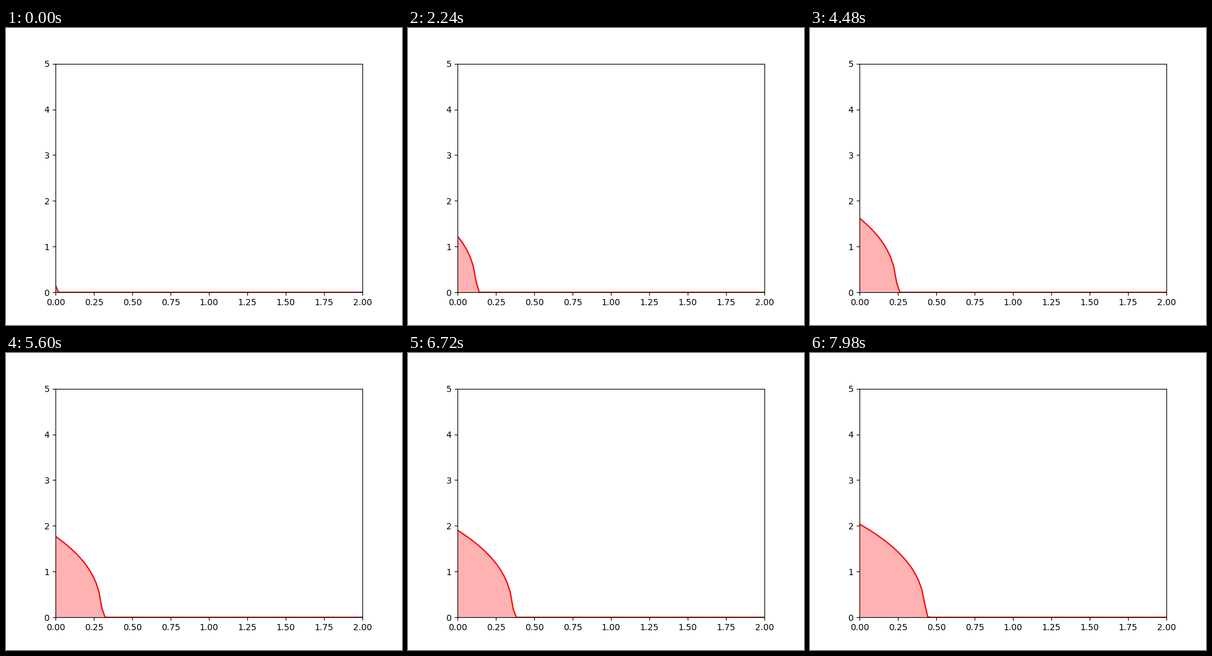
These frames come from a looping animation (640 px wide and 480 px high, 8000 ms). A matplotlib script:

```python
import numpy as np
import matplotlib.pyplot as plt
from matplotlib.animation import FuncAnimation

# Nonlinear heat wave u_t = (K u^P u_x)_x, driven from the left wall.
# Units: one grid cell in space, one visible step in time.
P = 2.5
SPEED = 0.3698
GAIN = 0.104
K = P * SPEED**2 / GAIN
SUB = 60
START = 5
STEPS = 58
HOLD = 7  # ticks of 20 ms per visible step

x = np.linspace(0, 2, 100)


def solve():
    u = np.zeros_like(x)
    dt = 1 / SUB
    out = []
    for n in range(1, START + (STEPS - 1) * SUB + 1):
        k = K * u**P
        flux = 0.5 * (k[1:] + k[:-1]) * np.diff(u)
        u[1:-1] += dt * np.diff(flux)
        u[0] = (GAIN * n * dt) ** (1 / P)
        if n % SUB == START:
            out.append(u.copy())
    return out


waves = solve()

fig, ax = plt.subplots(figsize=(6.4, 4.8), dpi=100)
ax.set_xlim(0, 2)
ax.set_ylim(0, 5)
line, = ax.plot(x, waves[0], color="red")
area, = ax.fill(x, waves[0], facecolor="red", alpha=0.3, linewidth=0)


def outline(u):
    xs = np.concatenate(([0], x, [2]))
    ys = np.concatenate(([0], u, [0]))
    return np.column_stack((xs, ys))


def update(i):
    u = waves[i // HOLD]
    line.set_ydata(u)
    area.set_xy(outline(u))
    return line, area


anim = FuncAnimation(fig, update, frames=400, interval=20,
                     repeat=True, repeat_delay=0, blit=False)
plt.show()
```
